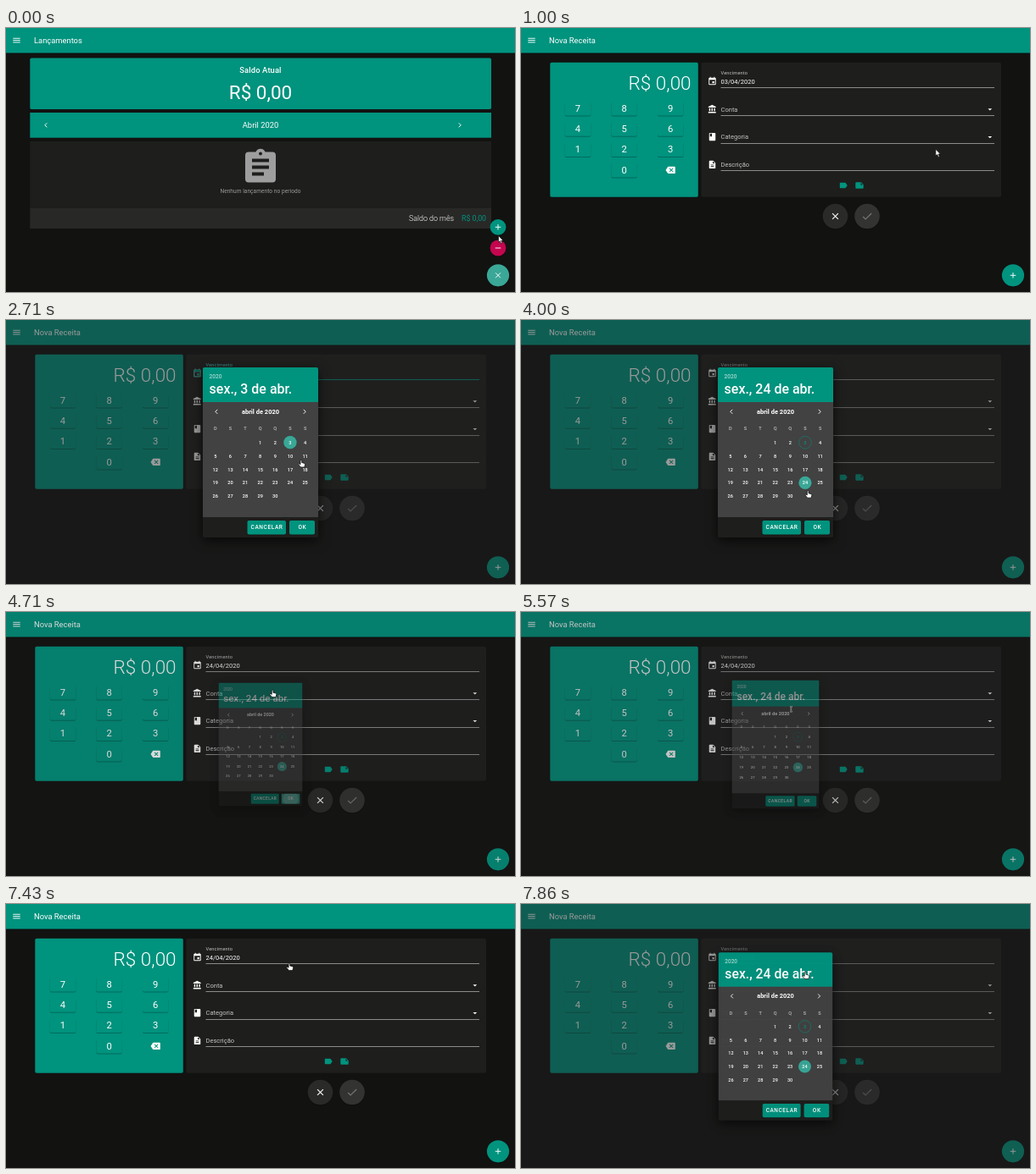
Recreate the animation shown at these times as an HTML page. Size 600 px wide and 312 px high, loop 8000 ms.

```html
<!DOCTYPE html>
<html lang="pt-BR">
<head>
<meta charset="utf-8">
<title>Nova Receita</title>
<style>
  html, body { margin: 0; width: 100%; height: 100%; overflow: hidden; background: #121211; }
  svg { display: block; width: 600px; height: 312px; font-family: Roboto, sans-serif; }
  text { fill: #fff; }
  .mid { text-anchor: middle; }
  .end { text-anchor: end; }
  .light { font-weight: 300; }
  .medium { font-weight: 500; }
  .bold { font-weight: 700; }
  .caps { letter-spacing: .089em; }
  .title { letter-spacing: .0125em; }
  .label { letter-spacing: .033em; }
  .dim { opacity: .65; }
  .soft { fill: #c4c4c4; }
  .grey { fill: #9c9c9c; }
  .teal { fill: #00937e; }
  .raised { filter: drop-shadow(0 1px .5px #0004); }
  .floating { filter: drop-shadow(0 4px 7px #000a); }
</style>
</head>
<body>
<svg id="stage" viewBox="0 0 600 312"></svg>
<script>
const TEAL = '#00937e', LIGHT_TEAL = '#3aa797', CARD = '#1e1e1d';

const LINE_ICONS = {
  menu: 'M3 7h18M3 12h18M3 17h18',
  plus: 'M5 12h14M12 5v14',
  minus: 'M5 12h14',
  close: 'M5.7 5.7l12.6 12.6m0-12.6L5.7 18.3',
  check: 'M4.200 12.700l4.800 4.800L20.300 6.300',
  left: 'M14.700 6.700L9.400 12l5.300 5.300',
  right: 'M9.300 6.700l5.300 5.300-5.300 5.300'
};
const SOLID_ICONS = {
  down: 'M7 10l5 5 5-5z',
  clipboard: 'M9.2 3a3 3 0 0 1 5.6 0H19q2 0 2 2v14q0 2-2 2H5q-2 0-2-2V5q0-2 2-2zM12 3a1 1 0 0 0 0 2 1 1 0 0 0 0-2zM7 7h10v2H7zm0 4h10v2H7zm0 4h7v2H7z',
  calendar: 'M5 3h1V1h2v2h8V1h2v2h1q2 0 2 2v14q0 2-2 2H5q-2 0-2-2V5q0-2 2-2zM5 8v11h14V8zM12 12h5v5h-5z',
  bank: 'M11.5 1L2 6v2h19V6zM2 22h19v-3H2zM4 10v7h3v-7zm6 0v7h3v-7zm6 0v7h3v-7z',
  book: 'M6 2h12q2 0 2 2v16q0 2-2 2H6q-2 0-2-2V4q0-2 2-2zM6 4v8l2.5-1.5L11 12V4z',
  file: 'M6 2h8l6 6v12q0 2-2 2H6q-2 0-2-2V4q0-2 2-2zM8 12h8v2H8zm0 4h8v2H8zM13 3.500V9h5.500z',
  label: 'M5 5h11q1 0 1.600.8L22 12l-4.400 6.200Q17 19 16 19H5q-2 0-2-2V7q0-2 2-2z',
  note: 'M4 4h12l6 6v8q0 2-2 2H4q-2 0-2-2V6q0-2 2-2zM15 5.500V11h5.500z',
  erase: 'M7 3h15q2 0 2 2v14q0 2-2 2H7q-1 0-1.600-.9L0 12l5.400-8.100Q6 3 7 3zM9 8.400L12.600 12 9 15.600 10.400 17 14 13.400 17.600 17 19 15.600 15.400 12 19 8.400 17.600 7 14 10.600 10.400 7z'
};

const text = (x, y, size, str, cls = '') =>
  `<text x="${x}" y="${y}" font-size="${size}" class="${cls}">${str}</text>`;
const rect = (x, y, w, h, fill, r = 0, extra = '') =>
  `<rect x="${x}" y="${y}" width="${w}" height="${h}" rx="${r}" fill="${fill}" ${extra}/>`;
const circle = (x, y, r, fill, extra = '') =>
  `<circle cx="${x}" cy="${y}" r="${r}" fill="${fill}" ${extra}/>`;
const group = (id, ...parts) => `<g id="${id}">${parts.join('')}</g>`;
const icon = (name, x, y, color = '#fff', size = 11.25) => {
  const line = LINE_ICONS[name];
  const paint = line ? `fill="none" stroke="${color}" stroke-width="2"` : `fill="${color}" fill-rule="evenodd"`;
  return `<path d="${line || SOLID_ICONS[name]}" ${paint} transform="translate(${x} ${y}) scale(${size / 24}) translate(-12 -12)"/>`;
};
const roundButton = (x, y, r, fill, name, color, size) =>
  circle(x, y, r, fill, 'class="raised"') + icon(name, x, y, color, size);

const overview = () => group('overview',
  text(33, 17.7, 9.375, 'Lançamentos'),
  rect(28.3, 35.5, 543.7, 60.5, TEAL, 1.8),
  text(300, 53.2, 9.375, 'Saldo Atual', 'mid medium title'),
  text(300, 84.4, 22.5, 'R$ 0,00', 'mid'),
  rect(28.3, 100, 543.7, 29.7, TEAL),
  icon('left', 47, 114.8), icon('right', 535, 114.8),
  text(300, 117.9, 9.375, 'Abril 2020', 'mid'),
  rect(28.3, 134, 543.7, 79, CARD),
  icon('clipboard', 300, 164.5, '#9e9e9e', 48),
  text(300, 195.2, 6.5, 'Nenhum lançamento no período', 'mid grey title'),
  rect(28.3, 213, 543.7, 24, '#282827'),
  text(528, 228.2, 8.85, 'Saldo do mês', 'end light'),
  text(566, 228.2, 8.75, 'R$ 0,00', 'end teal'),
  roundButton(580, 235.3, 9.4, TEAL, 'plus'),
  roundButton(580, 260, 9.4, '#c4064f', 'minus'),
  roundButton(580, 292.3, 13.1, LIGHT_TEAL, 'close')
);

const keypad = () => ['7', '8', '9', '4', '5', '6', '1', '2', '3', '', '0', 'erase'].map((key, i) => {
  const x = 67 + (i % 3) * 54.6, y = 95 + Math.floor(i / 3) * 24.3;
  if (!key) return '';
  if (key === 'erase') return icon(key, x, y);
  return rect(x - 15.2, y - 8.5, 30.4, 17, TEAL, 1.8, 'class="raised"') + text(x, y + 3.8, 11.25, key, 'mid');
}).join('');

const FIELDS = [['calendar', ''], ['bank', 'Conta'], ['book', 'Categoria'], ['file', 'Descrição']];
const fields = () => FIELDS.map(([name, label], i) => {
  const y = 63 + i * 32.8;
  return icon(name, 225.5, y) + text(235.5, y + 2.7, 7.55, label, 'soft') +
    rect(235.5, Math.round(y + 7), 322.5, 1, '#8c8c8c') +
    (i === 1 || i === 2 ? icon('down', 552.8, y + .3) : '');
}).join('');

const fieldLabel = cls => text(235.5, 54.8, 5.63, 'Vencimento', 'label ' + cls);
const fieldDate = (id, date) => group(id, text(235.5, 65.6, 7.55, date));

const form = () => group('form',
  text(33, 17.7, 9.375, 'Nova Receita'),
  rect(34.3, 40.8, 174.5, 159, TEAL, 1.8),
  text(200.6, 73, 22.5, 'R$ 0,00', 'end light'),
  keypad(),
  rect(212.5, 40.8, 353.5, 159, CARD, 1.8),
  fields(), fieldLabel('soft'),
  fieldDate('oldDate', '03/04/2020'), fieldDate('newDate', '24/04/2020'),
  group('focus', icon('calendar', 225.5, 63, TEAL), fieldLabel('teal'), rect(235.5, 70, 322.5, 1, TEAL)),
  icon('label', 380, 186, TEAL), icon('note', 399, 186, TEAL),
  roundButton(370.5, 222.5, 14.8, '#2a2a29', 'close', '#fff', 13),
  roundButton(408, 222.5, 14.8, '#333332', 'check', '#747474', 15),
  roundButton(580, 292.3, 13.1, TEAL, 'plus')
);

// The month starts on a Wednesday, the fourth column.
const column = i => 246.8 + i * 17.63;
const dayPos = day => [column((day + 2) % 7), 144.7 + Math.floor((day + 2) / 7) * 15.9];
const dayText = (day, cls = '') => {
  const [x, y] = dayPos(day);
  return text(x, y + 2, 5.63, day, 'mid medium ' + cls);
};
const picked = day => group('pick' + day,
  text(239.6, 87.2, 15.94, `sex., ${day} de abr.`, 'medium'),
  circle(...dayPos(day), 7.6, LIGHT_TEAL), dayText(day));

const button = (id, x, w, label) =>
  rect(x, 237, w, 16.5, TEAL, 1.8, 'class="raised"') +
  text(x + w / 2 + .3, 247.4, 6.56, label, 'mid medium caps') +
  `<clipPath id="${id}Clip">${rect(x, 237, w, 16.5, '#fff', 1.8)}</clipPath>` +
  `<g id="${id}" clip-path="url(#${id}Clip)">${rect(x, 237, w, 16.5, '#fff', 0, 'opacity=".2"')}${circle(x + w / 2, 245, w * .42, '#fff', 'opacity=".25"')}</g>`;

const dialog = () => group('dialog',
  rect(232, 56, 136, 201, CARD, 1.8, 'class="floating"'),
  rect(232, 56, 136, 43, TEAL, 1.8),
  rect(232, 97, 136, 136, '#424242'),
  text(239.6, 68.9, 6.56, '2020', 'medium dim'),
  icon('left', 248, 108.3), icon('right', 352, 108.3),
  text(300, 110.7, 7.5, 'abril de 2020', 'mid bold'),
  ...[...'DSTQQSS'].map((d, i) => text(column(i), 130.3, 5.63, d, 'mid medium dim')),
  ...Array.from({ length: 30 }, (_, i) => dayText(i + 1, i === 2 ? 'teal' : '')),
  circle(...dayPos(3), 7.3, 'none', `stroke="${TEAL}" stroke-width=".5"`),
  picked(3), picked(24),
  button('cancel', 284.5, 45.5, 'CANCELAR'), button('ok', 334, 30, 'OK')
);

const pointer = () => group('pointer',
  group('arrow', '<path d="M0 0v7.8l1.8-1.6 1.3 3 1.4-.6-1.3-2.9h2.4z" fill="#fff" stroke="#000" stroke-width=".6"/>'),
  group('hand', '<path d="M-.8.4q.9-1 1.7 0v2.8l3.2.9q.8.4.6 1.5l-.7 3h-4.400l-2.700-3.200q0-1 1-.9l1.300.9z" fill="#fff" stroke="#000" stroke-width=".7"/>'),
  group('beam', ...['#fff', '#000'].map((color, i) =>
    `<path d="M-1.300-3h2.600M0-3v6M-1.300 3h2.600" fill="none" stroke="${color}" stroke-width="${1.3 - i * .7}"/>`)));

document.getElementById('stage').innerHTML = [
  rect(0, 0, 600, 312, '#121211'),
  rect(0, 0, 600, 29.5, TEAL, 0, 'class="raised"'),
  icon('menu', 12.5, 14.6),
  overview(), form(),
  group('scrim', rect(0, 0, 600, 312, '#212121')),
  dialog(), pointer()
].join('');

const LOOP = 8000, FPS = 7;
const ROUTE = 500, FOCUS = 2280, PICK_24 = 3840, PICK_3 = 6140;
const SESSIONS = [
  { open: 2370, close: 4656, button: 'ok' },
  { open: 5519, close: 6940, button: 'cancel' },
  { open: 7667, close: Infinity }
];
const STOPS = [
  { at: 0, x: 580.5, y: 245.5, shape: 'arrow' },
  { at: ROUTE, x: 579, y: 237, shape: 'arrow' },
  { at: 1000, x: 488.8, y: 143.3, shape: 'arrow' },
  { at: FOCUS - 200, x: 346, y: 65, shape: 'beam' },
  { at: 2700, x: 348, y: 165, shape: 'hand' },
  { at: PICK_24, x: 335, y: 190, shape: 'hand' },
  { at: 4560, x: 349, y: 242, shape: 'hand' },
  { at: 4710, x: 314, y: 92.5, shape: 'hand' },
  { at: 4950, x: 317, y: 65, shape: 'beam' },
  { at: 5519, x: 317, y: 112, shape: 'beam' },
  { at: PICK_3, x: 334, y: 143, shape: 'hand' },
  { at: 6800, x: 301, y: 241, shape: 'hand' },
  { at: 7450, x: 335, y: 64, shape: 'beam' },
  { at: 7850, x: 335, y: 80, shape: 'hand' }
];

const $ = id => document.getElementById(id);
const fade = (id, opacity) => $(id).style.opacity = Number(opacity);
const easeOut = x => 1 - (1 - Math.min(1, Math.max(0, x))) ** 3.7;
const openness = (t, duration) => Math.max(...SESSIONS.map(({ open, close }) =>
  easeOut((t - open) / duration) - easeOut((t - close) / duration)));

function movePointer(t) {
  const i = STOPS.findLastIndex(stop => stop.at <= t);
  const from = STOPS[i], to = STOPS[i + 1] || from;
  const part = to === from ? 0 : (t - from.at) / (to.at - from.at);
  const mix = key => from[key] + (to[key] - from[key]) * part;
  $('pointer').setAttribute('transform', `translate(${mix('x')} ${mix('y')})`);
  for (const shape of ['arrow', 'hand', 'beam']) fade(shape, shape === from.shape);
}

function render(t) {
  const [first, second] = SESSIONS;
  const show24 = t >= PICK_24 && t < PICK_3 || t >= second.close;
  fade('overview', t < ROUTE);
  fade('form', t >= ROUTE);
  fade('oldDate', t < first.close);
  fade('newDate', t >= first.close);
  fade('focus', t >= FOCUS && t < PICK_24);
  fade('pick3', !show24);
  fade('pick24', show24);
  for (const { close, button } of SESSIONS) {
    if (button) fade(button, Math.abs(t - close - 50) < 200);
  }
  const shown = openness(t, 300);
  fade('scrim', openness(t, 240) * .46);
  fade('dialog', shown);
  $('dialog').setAttribute('transform', `translate(300 156.5) scale(${.5 + shown / 2}) translate(-300 -156.5)`);
  movePointer(t);
}

const start = performance.now();
function tick() {
  const time = (performance.now() - start + 5) % LOOP;
  render(Math.floor(time * FPS / 1000) * 1000 / FPS);
  requestAnimationFrame(tick);
}
tick();
</script>
</body>
</html>
```
